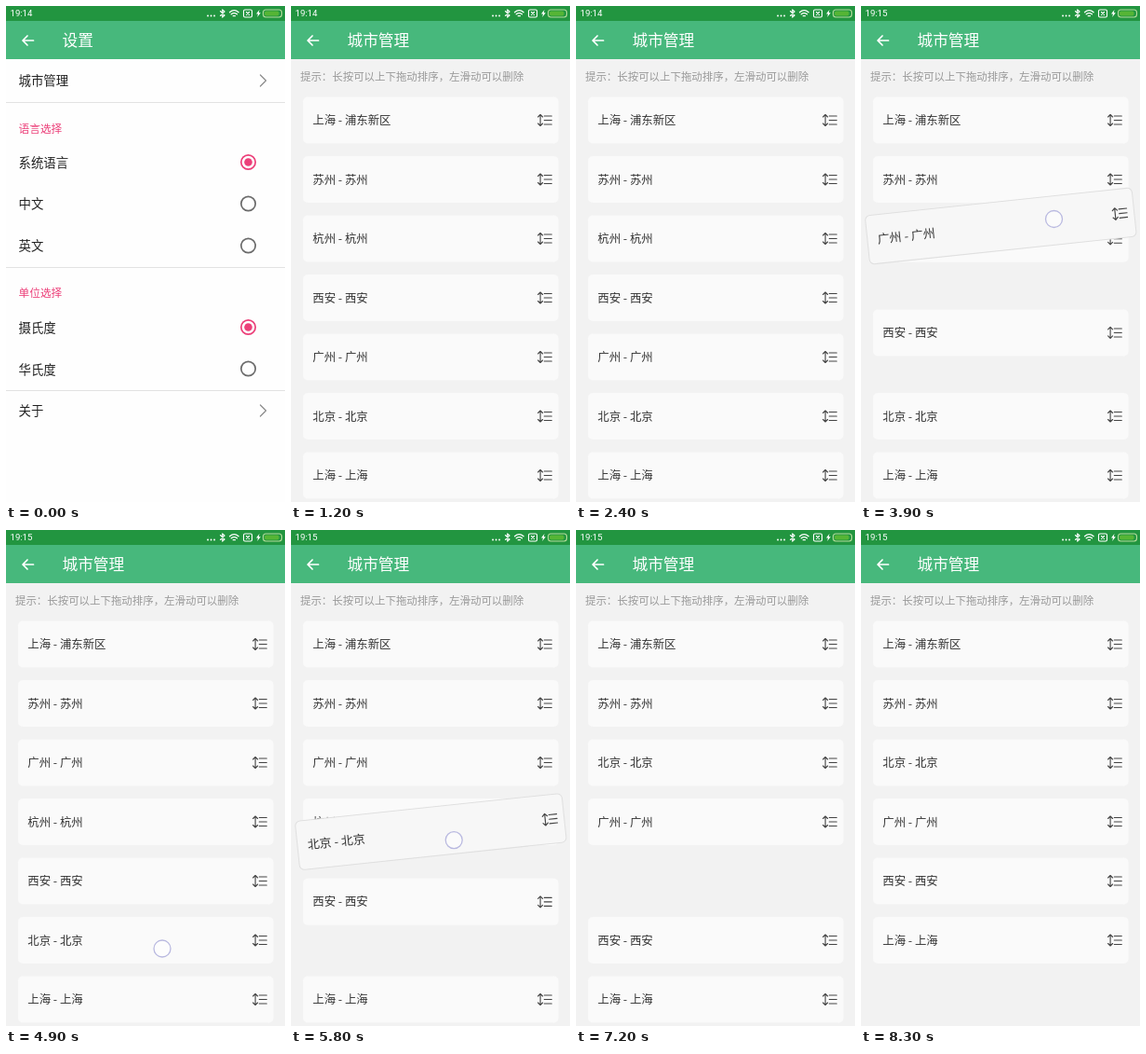
An HTML page for the animation above (8800 ms loop, 300 by 532 pixels).

```html
<!DOCTYPE html>
<html lang="zh">
<head>
<meta charset="utf-8">
<title>城市管理</title>
<style>
html, body { margin: 0; width: 100%; height: 100%; overflow: hidden; background: #f2f2f2; }
svg { display: block; width: 100vw; height: 100vh; font-family: "Noto Sans CJK SC", "Noto Sans CJK", sans-serif; }
.line { fill: none; stroke-linecap: round; stroke-linejoin: round; }
#clock { font: 9.6px Roboto, sans-serif; }
</style>
</head>
<body>
<svg viewBox="0 0 300 532">
  <g id="settings"><rect width="300" height="532" fill="#fefefe"/></g>
  <g id="cities"><rect width="300" height="532" fill="#f2f2f2"/></g>
  <ellipse id="glowTop" cx="150" cy="90" rx="190" fill="#ddd" opacity=".5"/>
  <ellipse id="glowBottom" cx="150" cy="532" rx="190" fill="#ddd" opacity=".5"/>
  <circle id="finger" r="9" fill="#fff" fill-opacity=".5" stroke="#b9b9e0" stroke-width="1.3"/>
  <g id="status">
    <rect width="300" height="16" fill="#229540"/>
    <text id="clock" x="4.500" y="11.4" fill="#fff"></text>
    <g class="line" stroke="#fff" stroke-width="1.1">
      <path d="M217 10.5h.1M220.500 10.500h.1M224 10.500h.1" stroke-width="1.8"/>
      <path d="M230.500 5.500l4.500 4.500-2.300 2.200v-8.400l2.300 2.200-4.500 4.500"/>
      <path d="M240.500 6.700q4.800-4 9.600 0M242.200 8.800q3.100-2.400 6.200 0M244.200 10.700h2.200" stroke-width="1.300"/>
      <rect x="255.500" y="4" width="9" height="8" rx="1.5"/>
      <path d="M258.500 6.500l3 3m0-3l-3 3"/>
      <rect x="276.500" y="4" width="20" height="8" rx="3" stroke="#b5dc9a"/>
    </g>
    <rect x="278" y="5.500" width="15.500" height="5" rx="1.8" fill="#55b535"/>
    <path d="M272.500 4l-3.500 4.500h2l-.8 3.500 3.600-4.700h-2z" fill="#fff"/>
  </g>
</svg>
<script>
const $ = id => document.getElementById(id);
const settings = $('settings'), cities = $('cities'), finger = $('finger');
const LOOP = 8800, STEP = 100, PINK = '#ec407a';

function set(el, attrs) {
  for (const k in attrs) el.setAttribute(k, attrs[k]);
  return el;
}
function add(parent, tag, attrs) {
  return parent.appendChild(set(document.createElementNS('http://www.w3.org/2000/svg', tag), attrs));
}
function label(parent, str, x, y, size, fill) {
  add(parent, 'text', {x, y: y + size * .37, 'font-size': size, fill}).textContent = str;
}
function line(parent, d, stroke, width) {
  add(parent, 'path', {d, stroke, 'stroke-width': width, class: 'line'});
}
function appBar(page, title) {
  add(page, 'rect', {y: 16, width: 300, height: 41, fill: '#47b87c'});
  line(page, 'M29.500 37h-11.500m5-5l-5 5 5 5', '#fff', 1.7);
  label(page, title, 60.5, 37.2, 16.7, '#fff');
}

// Settings page
const press = add(settings, 'rect', {y: 57, width: 300, height: 46, fill: '#e8e8e8'});
appBar(settings, '设置');
[['城市管理', 80.5], ['系统语言', 168], ['中文', 212.5], ['英文', 257.5],
 ['摄氏度', 345], ['华氏度', 390], ['关于', 434.5]]
  .forEach(([str, y]) => label(settings, str, 13.5, y, 13.4, '#222'));
label(settings, '语言选择', 13.5, 131.5, 11.7, PINK);
label(settings, '单位选择', 13.5, 308, 11.7, PINK);
for (const y of [103, 280, 412]) add(settings, 'rect', {y, width: 300, height: 1, fill: '#e2e2e2'});
for (const y of [80, 434]) line(settings, `M273.500 ${y - 6}l6 6-6 6`, '#8a8a8a', 1.2);
[167.5, 212, 257, 344.5, 389].forEach((cy, i) => {
  const on = i % 3 == 0;
  add(settings, 'circle', {cx: 260.5, cy, r: 7.7, fill: 'none', stroke: on ? PINK : '#6b6b6b', 'stroke-width': 1.7});
  if (on) add(settings, 'circle', {cx: 260.5, cy, r: 4.3, fill: PINK});
});

// City page
appBar(cities, '城市管理');
label(cities, '提示：长按可以上下拖动排序，左滑动可以删除', 10, 76, 11.45, '#999');

const slot = n => 122.5 + 63.5 * n;
const mix = (a, b, u) => a + (b - a) * u;
const ease = u => u * u * (3 - 2 * u);

// Interpolates points of the form [time, value].
function track(t, points) {
  const i = points.findIndex(p => p[0] > t);
  if (i == 0) return points[0][1];
  if (i < 0) return points.at(-1)[1];
  const [a, b] = [points[i - 1], points[i]];
  return mix(a[1], b[1], (t - a[0]) / (b[0] - a[0]));
}

// moves: [start time, new slot]; drag: [time, y], lifted from the first point to the last
const rows = [
  {name: '上海 - 浦东新区'},
  {name: '苏州 - 苏州'},
  {name: '杭州 - 杭州', moves: [[3890, 3], [5800, 4]]},
  {name: '西安 - 西安', moves: [[3760, 4], [5700, 5], [7700, 4]]},
  {name: '广州 - 广州', moves: [[5900, 3]],
   drag: [[3500, slot(4)], [3600, slot(4)], [3800, 264], [3900, 236], [4050, 244], [4200, 244], [4400, slot(2)]]},
  {name: '北京 - 北京',
   drag: [[5300, slot(5)], [5500, slot(5)], [6000, 246], [6300, slot(2)]]},
  {name: '上海 - 上海', moves: [[7700, 5]]},
];
rows.forEach((row, i) => {
  row.home = i;
  row.el = add(cities, 'g', {});
  row.card = add(row.el, 'rect', {x: -137.3, y: -25, width: 274.6, height: 50, rx: 5});
  label(row.el, row.name, -127, 0, 12.4, '#333');
  line(row.el, 'M117.800-6v12m-2.500-9.500l2.500-2.500 2.500 2.500m-5 7l2.500 2.500 2.500-2.500M122-4.500h8M122 0h8M122 4.500h8', '#444', 1.1);
});
for (const row of [rows[4], rows[5]]) cities.append(row.el);

function rowY(row, t) {
  let y = slot(row.home);
  if (row.drag && t >= row.drag[0][0]) y = track(t, row.drag);
  for (const [start, to] of row.moves || [])
    y = mix(y, slot(to), ease(Math.min(1, Math.max(0, (t - start) / 250))));
  return y;
}

// Each touch: [time, x, y] points; visible until the last time
const touches = [
  [[200, 197, 82], [600, 197, 82]],
  [[1800, 197, 372], [2100, 209, 308], [2400, 197, 385]],
  [[3000, 188.5, 371], [3600, 188.5, 371], [3800, 202, 256], [3900, 207.5, 228.5], [4050, 207.5, 236], [4200, 207.5, 236]],
  [[4900, 168, 449], [5500, 168, 449], [6000, 180, 255], [6100, 180, 255]],
  [[6900, 225, 377], [7000, 205, 377], [7200, 70, 377]],
];
const swipe = [[6900, 0], [7000, -12], [7100, -140], [7200, -300]];

function draw(t) {
  const push = 150 * (1 - Math.cos(Math.PI * track(t, [[600, 0], [900, 1]])));
  set(settings, {transform: `translate(${-push})`});
  set(cities, {transform: `translate(${300 - push})`});
  set(press, {opacity: track(t, [[200, 0], [400, 1], [600, 1], [800, 0]])});
  $('clock').textContent = t < 3600 ? '19:14' : '19:15';

  for (const row of rows) {
    const lifted = row.drag && t >= row.drag[0][0] && t < row.drag.at(-1)[0];
    const x = row.home == 2 ? track(t, swipe) : 0;
    set(row.el, {
      transform: `translate(${150.3 + x} ${rowY(row, t)})` + (lifted ? 'rotate(-6) scale(1.05)' : ''),
      opacity: Math.max(0, 1 + x / 275),
    });
    set(row.card, {fill: lifted ? '#f7f7f7' : '#fafafa', stroke: lifted ? '#e0e0e0' : 'none'});
  }

  set($('glowBottom'), {ry: track(t, [[1800, 0], [2000, 43], [2200, 0]])});
  set($('glowTop'), {ry: track(t, [[2100, 0], [2300, 28], [2400, 0]])});

  const touch = touches.find(p => t >= p[0][0] && t < p.at(-1)[0]);
  finger.style.display = touch ? '' : 'none';
  if (touch) set(finger, {
    cx: track(t, touch),
    cy: track(t, touch.map(p => [p[0], p[2]])),
  });
}

const start = performance.now();
function frame() {
  const t = (performance.now() - start) % LOOP;
  draw(Math.floor(t / STEP) * STEP);
  requestAnimationFrame(frame);
}
frame();
</script>
</body>
</html>
```
